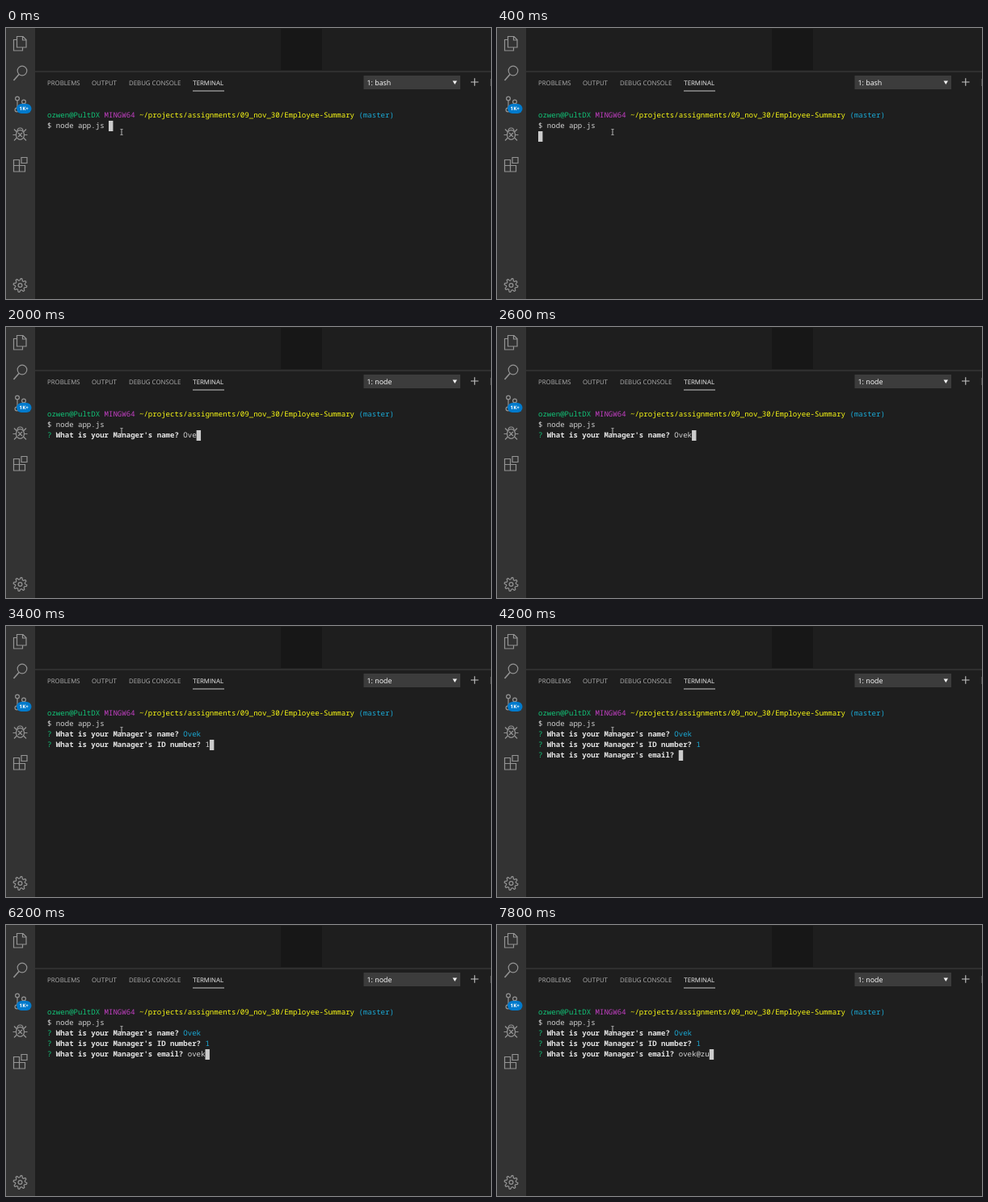
An HTML page for the animation above (8 s loop, 600x336 px).

```html
<!DOCTYPE html>
<html lang="en">
<head>
<meta charset="utf-8">
<title>Terminal session</title>
<style>
  html, body { margin: 0; width: 100%; height: 100%; overflow: hidden; background: #1e1e1e; }
  svg { display: block; width: 100%; height: 100%; }
  text { white-space: pre; text-rendering: geometricPrecision; }
  .ui { font-family: "Open Sans", sans-serif; font-size: 7.85px; fill: #b0b0b0; }
  .ui .active { fill: #f2f2f2; }
  .mono { font-family: "Noto Sans Mono", monospace; font-size: 9.05px; font-weight: 500; fill: #d4d4d4; }
  .icons { fill: none; stroke: #949494; stroke-width: 1.2; }
  .green { fill: #12c478; }
  .purple { fill: #c23fc2; }
  .yellow { fill: #fafa14; }
  .cyan { fill: #1aaad6; }
  .bold { fill: #e5e5e5; font-weight: 700; }
</style>
</head>
<body>
<svg viewBox="0 0 600 336">
  <rect width="600" height="336" fill="#1e1e1e"/>
  <rect width="36" height="336" fill="#333"/>

  <g class="icons">
    <path d="M13.5 10.5h7.5l4 4v9.5h-11.5zM20.5 10.5v4.5h4.5M13.5 14.5h-4v13.5h11v-4"/>
    <path d="M16 57.5L9.500 65" stroke-width="1.6"/>
    <circle cx="20" cy="53" r="5.8"/>
    <circle cx="14" cy="87.5" r="2.4"/>
    <circle cx="22" cy="91.5" r="2.4"/>
    <circle cx="13.5" cy="101.5" r="2.4"/>
    <path d="M14 90v9M22 94q0 3-8 4"/>
    <ellipse cx="17.5" cy="132.5" rx="5" ry="5.8"/>
    <path d="M14 128q0-4 3.500-4t3.500 4M12.5 132.5h-4M22.500 132.5h4M13.500 129l-3.500-3.500M21.500 129l3.500-3.500M13.500 136l-3.500 3.500M21.500 136l3.500 3.500M15 130l5 5M20 130l-5 5"/>
    <path d="M9.500 163.500h7v7h7v7.500h-14zM9.500 170.500h7v7.500M19 160.500h7v7h-7z"/>
    <path id="gear" stroke-linejoin="round"/>
    <circle cx="17.5" cy="319" r="2.4"/>
  </g>
  <rect x="13" y="94" width="18.5" height="12" rx="6" fill="#007acc"/>
  <text class="ui" x="22.2" y="102.4" text-anchor="middle" style="font-size:6.2px;font-weight:700;fill:#fff">1K+</text>

  <rect x="340" y="1" width="51" height="51" fill="#171717"/>
  <path d="M36 54H600" stroke="#414141"/>

  <g class="ui">
    <text x="51" y="71">PROBLEMS</text>
    <text x="106" y="71">OUTPUT</text>
    <text x="152" y="71">DEBUG CONSOLE</text>
    <text x="231.3" y="71" class="active">TERMINAL</text>
  </g>
  <path d="M231 78h39" stroke="#c8c8c8"/>
  <rect x="442.5" y="59" width="119.5" height="17" fill="#3c3c3c"/>
  <text id="shell" class="ui" x="446.5" y="71" style="font-size:8.9px;fill:#fff"></text>
  <path d="M552.5 65.500h5.500l-2.750 4.500z" fill="#f0f0f0"/>
  <path d="M575 67h9.500M579.750 62.250v9.500" stroke="#c5c5c5" stroke-width="1.1"/>
  <path d="M600 63v9" stroke="#777"/>

  <g id="lines" class="mono"></g>
  <rect id="caret" width="5.43" height="13" fill="#ccc"/>
  <path d="M141.5 125.5h1l.5.5.5-.5h1M143 126v6M141.500 132.500h1l.5-.5.5.5h1" fill="none" stroke="#ddd" stroke-width=".8"/>
</svg>

<script>
const LOOP = 8000, LEFT = 51, TOP = 102, ROW = 13, CELL = 5.43;
const $ = id => document.getElementById(id);

// Each question: when it appears, when each key is pressed, when it is confirmed.
const questions = [
  { label: "name", answer: "Ovek", start: 800, keys: [1400, 1600, 2000, 2200], enter: 3000 },
  { label: "ID number", answer: "1", start: 3000, keys: [3400], enter: 4000 },
  { label: "email", answer: "ovek@zu", start: 4000, keys: [5200, 5400, 5600, 5800, 6600, 7200, 7600], enter: LOOP },
];

const header = [
  ["green", "ozwen@PultDX "],
  ["purple", "MINGW64 "],
  ["yellow", "~/projects/assignments/09_nov_30/Employee-Summary "],
  ["cyan", "(master)"],
];

function gearPath(x, y, teeth) {
  const points = Array.from({ length: teeth * 4 }, (_, i) => {
    const angle = (i + 0.5) * Math.PI / (teeth * 2);
    const radius = i % 4 < 2 ? 8.4 : 6;
    return `${x + radius * Math.cos(angle)} ${y + radius * Math.sin(angle)}`;
  });
  return `M${points.join("L")}Z`;
}

function questionLine({ label, answer, keys, enter }, t) {
  const typed = answer.slice(0, keys.filter(k => k <= t).length);
  return [
    ["green", "? "],
    ["bold", `What is your Manager's ${label}? `],
    [t >= enter ? "cyan" : "plain", typed],
  ];
}

function sessionLines(t) {
  const lines = [header, [["plain", "$ node app.js "]]];
  const asked = questions.filter(q => q.start <= t);
  lines.push(...asked.map(q => questionLine(q, t)));
  if (t >= 200 && !asked.length) lines.push([]);
  return lines;
}

const lineMarkup = (line, row) =>
  `<text x="${LEFT}" y="${TOP + row * ROW + 9.2}">` +
  line.map(([style, text]) => `<tspan class="${style}">${text}</tspan>`).join("") + "</text>";

function draw(t) {
  const lines = sessionLines(t);
  const column = lines.at(-1).reduce((sum, [, text]) => sum + text.length, 0);
  const markup = lines.map(lineMarkup).join("");
  if (markup !== draw.last) $("lines").innerHTML = draw.last = markup;
  $("caret").setAttribute("x", LEFT + column * CELL);
  $("caret").setAttribute("y", TOP + (lines.length - 1) * ROW);
  $("shell").textContent = t < 600 ? "1: bash" : "1: node";
}

$("gear").setAttribute("d", gearPath(17.5, 319, 8));
const begin = performance.now();
function frame() {
  draw((performance.now() - begin) % LOOP);
  requestAnimationFrame(frame);
}
frame();
</script>
</body>
</html>
```
